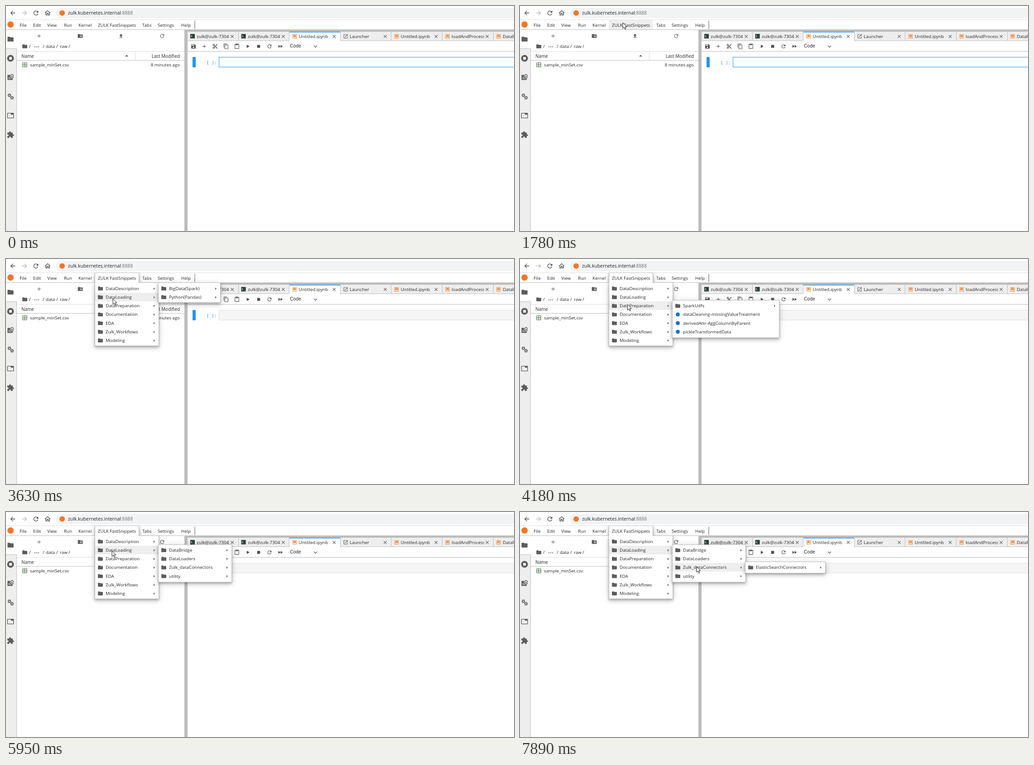
An HTML page with a canvas for the animation above (8000 ms loop, 1122 by 499 pixels).

```html
<!DOCTYPE html>
<html lang="en">
<head>
<meta charset="utf-8">
<title>Notebook menu walkthrough</title>
<style>
  html, body { margin: 0; width: 100%; height: 100%; overflow: hidden; background: #fff; }
  canvas { display: block; }
</style>
</head>
<body>
<canvas id="stage" width="1122" height="499"></canvas>
<script>
const ctx = document.getElementById('stage').getContext('2d');
const LOOP = 8000, ROW = 19.2, PAD = 3.5, MENU_TOP = 55.8;
const UI = '"Open Sans", "Noto Sans", sans-serif';
const INK = '#262626', GREY = '#5c5c5c', LINE = '#bdbdbd', BLUE = '#2196f3', ORANGE = '#f37726';

// Icon outlines on a 24 unit grid
const shapes = {
  folder: 'M10 4H4c-1.1 0-2 .9-2 2v12c0 1.1.9 2 2 2h16c1.1 0 2-.9 2-2V8c0-1.1-.9-2-2-2h-8z',
  add: 'M19 13h-6v6h-2v-6H5v-2h6V5h2v6h6z',
  newFolder: 'M20 6h-8l-2-2H4C2.9 4 2 4.9 2 6v12c0 1.1.9 2 2 2h16c1.1 0 2-.9 2-2V8c0-1.1-.9-2-2-2zm-1 8h-3v3h-2v-3h-3v-2h3V9h2v3h3z',
  upload: 'M9 16h6v-6h4l-7-7-7 7h4zm-4 2h14v2H5z',
  refresh: 'M17.65 6.35A8 8 0 0 0 12 4a8 8 0 1 0 7.73 10h-2.08A6 6 0 1 1 12 6c1.66 0 3.14.69 4.22 1.78L13 11h7V4z',
  save: 'M17 3H5c-1.1 0-2 .9-2 2v14c0 1.1.9 2 2 2h14c1.1 0 2-.9 2-2V7zm-5 16a3 3 0 1 1 0-6 3 3 0 0 1 0 6zm3-10H5V5h10z',
  cut: 'M9.64 7.64A4 4 0 1 0 7.64 9.64L10 12l-2.36 2.36A4 4 0 1 0 9.64 16.36L12 14l7 7h3v-1zM6 8a2 2 0 1 1 0-4 2 2 0 0 1 0 4zm0 12a2 2 0 1 1 0-4 2 2 0 0 1 0 4zM19 3l-6 6 2 2 7-7V3z',
  copy: 'M16 1H4c-1.1 0-2 .9-2 2v14h2V3h12zm3 4H8c-1.1 0-2 .9-2 2v14c0 1.1.9 2 2 2h11c1.1 0 2-.9 2-2V7c0-1.1-.9-2-2-2zm0 16H8V7h11z',
  paste: 'M19 2h-4.2a3 3 0 0 0-5.6 0H5c-1.1 0-2 .9-2 2v16c0 1.1.9 2 2 2h14c1.1 0 2-.9 2-2V4c0-1.1-.9-2-2-2zm-7 0a1 1 0 1 1 0 2 1 1 0 0 1 0-2zm7 18H5V4h2v3h10V4h2z',
  run: 'M8 5v14l11-7z',
  stop: 'M6 6h12v12H6z',
  forwardAll: 'M4 18l8.5-6L4 6zm9-12v12l8.5-6z',
  close: 'M19 6.4 17.6 5 12 10.6 6.4 5 5 6.4 10.6 12 5 17.6 6.4 19 12 13.4 17.6 19 19 17.6 13.4 12z',
  stopCircle: 'M12 2a10 10 0 1 0 0 20 10 10 0 0 0 0-20zm4 14H8V8h8z',
  inspect: 'M2 4h9a7 7 0 0 0 8 10v7H2zM5 12h5v1.8H5zM5 16h10v1.8H5zM17 2a5 5 0 1 1 0 10 5 5 0 0 1 0-10zm0 2a3 3 0 1 0 0 6 3 3 0 0 0 0-6zM20 11l3 3-1.5 1.5-3-3z',
  tab: 'M21 3H3c-1.1 0-2 .9-2 2v14c0 1.1.9 2 2 2h18c1.1 0 2-.9 2-2V5c0-1.1-.9-2-2-2zm0 16H3V5h10v4h8z',
  puzzle: 'M20.5 11H19V7c0-1.1-.9-2-2-2h-4V3.5a2.5 2.5 0 0 0-5 0V5H4c-1.1 0-2 .9-2 2v3.8h1.5a2.7 2.7 0 0 1 0 5.4H2V20c0 1.1.9 2 2 2h3.8v-1.5a2.7 2.7 0 0 1 5.4 0V22H17c1.1 0 2-.9 2-2v-4h1.5a2.5 2.5 0 0 0 0-5z',
  launch: 'M19 19H5V5h7V3H5c-1.1 0-2 .9-2 2v14c0 1.1.9 2 2 2h14c1.1 0 2-.9 2-2v-7h-2zM14 3v2h3.6l-9.8 9.8 1.4 1.4L19 6.4V10h2V3z',
  back: 'M20 11H7.8l5.6-5.6L12 4l-8 8 8 8 1.4-1.4L7.8 13H20z',
  next: 'M4 13h12.2l-5.6 5.6L12 20l8-8-8-8-1.4 1.4 5.6 5.6H4z',
  home: 'M12 3 2 12h3v8h6v-6h2v6h6v-8h3zm0 2.7 5 4.5V18h-2v-6H9v6H7v-7.8z',
  notebook: 'M2 2h20v20H2zm2 2v16h16V4zM6 6h12v12l-6-4.6L6 18z',
  grid: 'M1 1h22v22H1zm2.5 2.5v7.3h7.3V3.5zm9.7 0v7.3h7.3V3.5zM3.5 13.2v7.3h7.3v-7.3zm9.7 0v7.3h7.3v-7.3z'
};
const icons = Object.fromEntries(Object.entries(shapes).map(([k, d]) => [k, new Path2D(d)]));
const arrow = new Path2D('M0 0V12.6L2.9 9.9 5 14.8 7 13.9 5 9.2H8.8z');

const mainMenu = ['DataDescription', 'DataLoading', 'DataPreparation', 'Documentation', 'EDA', 'Zulk_Workflows', 'Modeling'];
const submenus = [
  { w: 138, items: ['BigData(Spark)', 'Python(Pandas)'] },
  { w: 163, items: ['DataBridge', 'DataLoaders', 'Zulk_dataConnectors', 'utility'] },
  { w: 237, items: ['SparkUdfs', 'py:dataCleaning-missingValueTreatment', 'py:derivedAttr-AggColumnByParent', 'py:pickleTransformedData'] }
];
const submenuTimes = [[3320, 0], [3700, 1], [4180, 2], [5950, 1]];
const MENU_OPEN = 2080, CONNECTORS_OPEN = 7890;

// Elevation layers: blur, offset, opacity
const elevation = [[4.2, 2.5, .2], [8.5, 5, .14], [15, 1, .12]];

// start, end, steps, from x/y, to x/y, exponent of x and y
const moves = [
  [370, 990, 9, 686, 478, 224, 82.5, .7, .7],
  [1070, 1150, 2, 224, 73, 225, 62, 1, 1],
  [1230, 1460, 4, 225, 55, 227, 37, 1, 1],
  [2860, 3630, 11, 230, 51.5, 236, 88, 1, 1],
  [3700, 4010, 5, 236, 90, 237.5, 100.5, 1, 1],
  [5570, 5950, 6, 237, 99, 234, 86, 1, 1],
  [6810, 7590, 11, 240, 86, 388, 116, 1, 4],
  [7670, 7740, 2, 389, 118.5, 390, 121, 1, 1]
];

function cursorAt(t) {
  const move = moves.filter(m => m[0] <= t).pop();
  if (!move) return null;
  const [start, end, steps, x0, y0, x1, y1, px, py] = move;
  const n = steps - 1;
  const u = Math.min(n, Math.floor((t - start) / (end - start) * n + .05)) / n;
  return { x: x0 + (x1 - x0) * u ** px, y: y0 + (y1 - y0) * u ** py };
}

function rect(x, y, w, h, color) {
  ctx.fillStyle = color;
  ctx.fillRect(x, y, w, h);
}

function frame(x, y, w, h, color) {
  ctx.strokeStyle = color;
  ctx.lineWidth = 1;
  ctx.strokeRect(x + .5, y + .5, w - 1, h - 1);
}

function rounded(x, y, w, h, r, color) {
  ctx.fillStyle = color;
  ctx.beginPath();
  ctx.roundRect(x, y, w, h, r);
  ctx.fill();
}

function raised(x, y, w, h) {
  ctx.save();
  for (const [blur, offset, opacity] of elevation) {
    ctx.shadowColor = `rgba(0,0,0,${opacity})`;
    ctx.shadowBlur = blur;
    ctx.shadowOffsetY = offset;
    rect(x, y, w, h, '#fff');
  }
  ctx.restore();
  frame(x, y, w, h, LINE);
}

function dot(x, y, r, color) {
  ctx.fillStyle = color;
  ctx.beginPath();
  ctx.arc(x, y, r, 0, 7);
  ctx.fill();
}

function text(s, x, y, { size = 9.75, color = INK, align = 'left', weight = 400, family = UI } = {}) {
  ctx.font = `${weight} ${size}px ${family}`;
  ctx.fillStyle = color;
  ctx.textAlign = align;
  ctx.fillText(s, x, y);
}

function icon(name, cx, cy, size = 13, color = GREY) {
  ctx.save();
  ctx.translate(cx - size / 2, cy - size / 2);
  ctx.scale(size / 24, size / 24);
  ctx.fillStyle = color;
  ctx.fill(icons[name], 'evenodd');
  ctx.restore();
}

function triangle(x, y, dx, dy) {
  ctx.fillStyle = GREY;
  ctx.beginPath();
  if (dx) { ctx.moveTo(x, y - 2.5); ctx.lineTo(x + dx, y); ctx.lineTo(x, y + 2.5); }
  else { ctx.moveTo(x - 3.5, y); ctx.lineTo(x, y + dy); ctx.lineTo(x + 3.5, y); }
  ctx.fill();
}

function gear(x, y, r) {
  ctx.fillStyle = GREY;
  ctx.beginPath();
  for (let i = 0; i < 24; i++) {
    const a = i * Math.PI / 12, d = i % 4 < 2 ? r : r * .72;
    ctx.lineTo(x + Math.cos(a) * d, y + Math.sin(a) * d);
  }
  ctx.closePath();
  ctx.moveTo(x + r * .36, y);
  ctx.arc(x, y, r * .36, 0, 2 * Math.PI);
  ctx.fill('evenodd');
}

function drawBrowserBar() {
  icon('back', 15, 15.5, 16, '#45494d');
  icon('next', 41, 15.5, 16, '#b5b8bb');
  icon('refresh', 66, 15.5, 16, '#45494d');
  icon('home', 92, 15.5, 16, '#45494d');
  rounded(110, 4, 1040, 23, 11.5, '#f1f3f4');
  dot(124, 15.5, 6, ORANGE);
  const host = 'zulk.kubernetes.internal';
  text(host, 137, 19, { size: 10.35, color: '#202124' });
  text(':8888', 137 + ctx.measureText(host).width, 19, { size: 10.35, color: '#70757a' });
  rect(0, 30, 1122, 1, '#dedede');
}

function drawMenuBar(hover) {
  dot(10, 41, 7, ORANGE);
  if (hover) rect(196, 31, 97, 21, '#eeeeee');
  const labels = [['File', 30], ['Edit', 60], ['View', 91], ['Run', 128], ['Kernel', 160],
    ['ZULK FastSnippets', 203], ['Tabs', 301], ['Settings', 335], ['Help', 387]];
  for (const [label, x] of labels) text(label, x, 45.5);
  rect(416.5, 33, 1, 18, '#555');
  rect(0, 52, 394, 1, LINE);
}

function drawSidebar() {
  rect(0, 53, 24, 446, '#eeeeee');
  rect(23, 94, 1, 405, LINE);
  rect(0, 53, 24, 41, '#fff');
  rect(0, 94, 24, 1, LINE);
  icon('folder', 10, 73.5, 16);
  icon('stopCircle', 10, 116, 18);
  icon('inspect', 10, 158, 16);
  gear(7.5, 198, 4.2);
  gear(13.3, 203.5, 4.2);
  icon('tab', 10, 243, 16);
  icon('puzzle', 10, 285.5, 17);
}

function drawFiles(hoverRow) {
  icon('add', 73, 66.5);
  icon('newFolder', 164, 66.5);
  icon('upload', 254, 66.5);
  icon('refresh', 345, 66.5);
  icon('folder', 41.5, 89.5);
  text('/', 51, 93);
  for (const x of [64, 68, 72]) dot(x, 90.5, .9, INK);
  for (const [s, x] of [['/', 81], ['data', 88], ['/', 111], ['raw', 119], ['/', 138]]) text(s, x, 93);
  rect(24, 100, 370, 1, '#dedede');
  rect(24, 120, 370, 1, LINE);
  rect(285, 101, 1, 19, '#dedede');
  text('Name', 34, 114.5, { weight: 500, size: 9.9 });
  text('Last Modified', 384, 114.5, { weight: 500, size: 9.9, align: 'right' });
  triangle(266.5, 112, 0, -3.5);
  if (hoverRow) rect(24, 121, 370, 19, '#eeeeee');
  icon('grid', 41.5, 130.5, 11, '#3b653b');
  text('sample_minSet.csv', 53, 134);
  text('8 minutes ago', 384, 134, { align: 'right' });
}

function drawTabs() {
  const terminal = 'zulk@zulk-73046';
  const tabs = [[terminal, 'term'], [terminal, 'term'], ['Untitled.ipynb', 'notebook'], ['Launcher', 'launch'],
    ['Untitled.ipynb', 'notebook'], ['loadAndProcessData', 'notebook'], ['DataPreparation', 'notebook']];
  rect(394, 52, 728, 5, LINE);
  rect(400, 57, 722, 20, '#eeeeee');
  rect(400, 76.5, 722, 1, LINE);
  rect(394, 52, 7, 447, LINE);
  tabs.forEach(([label, kind], i) => {
    const x = 400 + i * 112.6, edge = Math.round(x);
    const active = i === 2;
    if (active) {
      rect(edge, 57, 113, 21, '#fff');
      rect(edge, 57, 113, 1.5, BLUE);
    }
    rect(edge, 57, 1, 20, LINE);
    if (kind === 'term') {
      rect(x + 7, 62, 10, 10, '#2b4034');
      text('$_', x + 8, 69, { size: 6, color: '#fff', family: '"DejaVu Sans Mono", monospace' });
    } else {
      icon(kind, x + 12.3, 67.3, kind === 'launch' ? 12 : 11, kind === 'launch' ? GREY : '#ef8b3a');
    }
    ctx.save();
    ctx.beginPath();
    ctx.rect(x + 20, 58, 73, 18);
    ctx.clip();
    text(label, x + 21.3, 71, { size: 9.85 });
    ctx.restore();
    icon('close', x + 99.7, 67.5, 12, '#555');
  });
}

function drawNotebook(focused) {
  ['save', 'add', 'cut', 'copy', 'paste', 'run', 'stop', 'refresh', 'forwardAll']
    .forEach((name, i) => icon(name, 414 + i * 24, 89.5, 13, '#505050'));
  text('Code', 627, 92, { size: 10.3, family: '"Liberation Sans", sans-serif' });
  ctx.strokeStyle = GREY;
  ctx.lineWidth = 1.3;
  ctx.beginPath();
  ctx.moveTo(680, 88);
  ctx.lineTo(683.5, 91.5);
  ctx.lineTo(687, 88);
  ctx.stroke();
  rect(401, 100, 721, 1, '#c8c8c8');
  rect(401, 101, 721, 1, '#ececec');
  rounded(412, 113, 7, 23, 1.5, BLUE);
  text('[ ]:', 443, 128.5, { size: 9.2, color: '#307fc1', family: '"DejaVu Sans Mono", monospace' });
  rect(470, 113, 660, 23, focused ? '#fff' : '#f5f5f5');
  frame(470, 113, 660, 23, focused ? BLUE : '#e0e0e0');
}

function drawMenu(x, firstRow, w, items, active) {
  raised(x, Math.round(firstRow - PAD), w, Math.round(items.length * ROW + PAD * 2));
  items.forEach((item, i) => {
    const top = firstRow + i * ROW, mid = top + ROW / 2;
    if (i === active) rect(x + 1, Math.round(top), w - 2, 19, '#eeeeee');
    const isFile = item.startsWith('py:');
    if (isFile) dot(x + 12.5, mid, 4.5, '#1976c5');
    else {
      icon('folder', x + 12.5, mid, 13);
      triangle(x + w - 12, mid + .3, 3, 0);
    }
    text(isFile ? item.slice(3) : item, x + 24, mid + 3.4, { size: 9.8 });
  });
}

function drawOpenTitle() {
  ctx.save();
  ctx.beginPath();
  ctx.rect(190, 30, 110, 22);
  ctx.clip();
  raised(196, 30, 98, 24);
  ctx.restore();
  rect(197, 52, 96, 1, '#fff');
  text('ZULK FastSnippets', 203, 45.5);
}

function drawOpenMenus(t, cursor) {
  const inMain = cursor.x < 337;
  const mainRow = inMain ? Math.floor((cursor.y - MENU_TOP) / ROW) : 1;
  drawMenu(196, MENU_TOP, 142, mainMenu, mainRow);
  drawOpenTitle();

  const open = submenuTimes.filter(s => s[0] <= t).pop();
  if (!open) return;
  const { w, items } = submenus[open[1]];
  const top = MENU_TOP + open[1] * ROW;
  const subRow = inMain ? -1 : Math.floor((cursor.y - top) / ROW);
  drawMenu(336, top, w, items, subRow);
  if (t >= CONNECTORS_OPEN) drawMenu(497, top + 2 * ROW, 178, ['ElasticSearchConnectors'], -1);
}

function drawCursor({ x, y }) {
  ctx.save();
  ctx.translate(x, y);
  ctx.fillStyle = '#fff';
  ctx.strokeStyle = '#1c1c28';
  ctx.lineWidth = 1;
  ctx.fill(arrow);
  ctx.stroke(arrow);
  ctx.restore();
}

function draw(t) {
  const cursor = cursorAt(t);
  const menuOpen = t >= MENU_OPEN;
  rect(0, 0, 1122, 499, '#fff');
  drawBrowserBar();
  drawMenuBar(cursor && !menuOpen && cursor.y < 52);
  drawSidebar();
  drawFiles(cursor && !menuOpen && cursor.x < 394 && cursor.y > 121 && cursor.y < 140);
  drawTabs();
  drawNotebook(!menuOpen);
  if (menuOpen) drawOpenMenus(t, cursor);
  if (cursor) drawCursor(cursor);
}

const began = performance.now();
function tick() {
  draw((performance.now() - began) % LOOP);
  requestAnimationFrame(tick);
}
tick();
</script>
</body>
</html>
```
